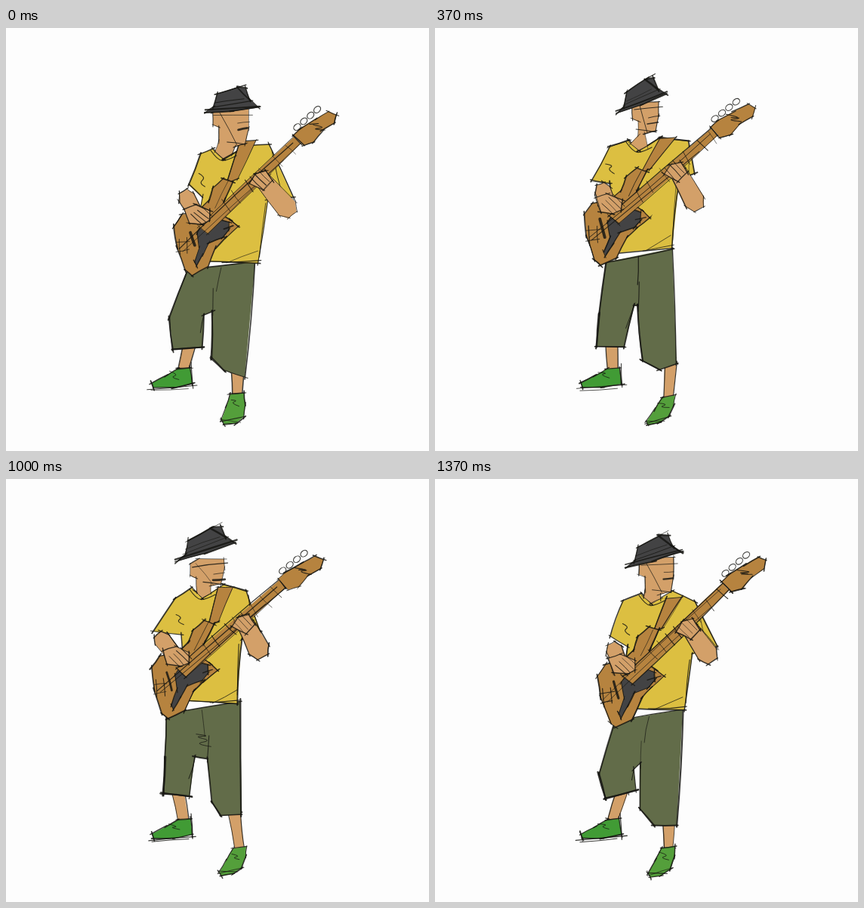
Recreate the animation shown at these times as an HTML page with a canvas. Size 560 px wide and 560 px high, loop 1500 ms.

```html
<!DOCTYPE html>
<html lang="en">
<head>
<meta charset="utf-8">
<title>Bass player sketch</title>
<style>
html, body { margin: 0; width: 100%; height: 100%; overflow: hidden; background: #fdfdfd; }
canvas { display: block; width: 560px; height: 560px; }
</style>
</head>
<body>
<canvas id="stage" width="560" height="560"></canvas>
<script>
const ctx = document.getElementById('stage').getContext('2d');
const PAPER = '#fdfdfd', INK = 'rgba(22,22,18,.84)';
const SKIN = '#d3a069', WOOD = '#b6833f', SHIRT = '#dcbf41', PANTS = '#626c49', DARK = '#434344';

const pts = s => s.split(' ').map(p => p.split(',').map(Number));
const mix = (a, b, k) => a.map((v, i) => v + (b[i] - v) * k);
const add = (p, x, y) => [p[0] + x, p[1] + y];

// hat: brim ends; head: ear, jaw, collar; bass: tail, tip; arms: elbows; foot: ankle, toe
// shirt: shoulders, right cuff, hem, left cuff; pants: clockwise from the waist
const pose = (hat, head, shirt, bass, arms, pants, foot) =>
  [hat, head, shirt, bass, arms, pants, foot].map(pts);

const right = pose('265,112 334,106', '274,112 321,153 288,173',
  '258,166 348,154 380,224 347,227 334,312 245,308 260,224 242,208',
  '225,299 438,114', '239,224 372,239',
  '240,320 330,309 316,462 290,454 272,437 273,375 262,380 260,423 221,426 216,384', '306,484 298,524');
const right2 = pose('254,117 326,97', '270,110 316,149 287,165',
  '248,162 344,162 374,221 341,232 330,306 242,303 255,222 232,208',
  '218,299 439,107', '237,226 361,232',
  '238,320 328,305 320,459 290,459 271,436 271,377 263,384 266,412 226,423 217,390', '309,487 294,526');
const midRight = pose('247,114 319,94', '262,108 310,142 282,163',
  '240,160 344,154 351,206 334,212 322,300 240,296 243,204 217,193',
  '211,291 432,104', '218,206 353,229',
  '230,304 322,298 313,459 285,449 272,436 271,385 264,387 258,415 222,423 217,378', '312,487 292,525');
const midLeft = pose('241,113 305,88', '261,104 296,136 270,162',
  '231,157 335,150 344,192 323,202 314,291 240,298 232,206 208,202',
  '199,284 425,105', '222,215 344,230',
  '226,310 314,292 320,445 297,452 274,440 268,368 264,368 250,422 214,421 217,380', '309,488 291,524');
const left = pose('226,109 303,85', '244,112 289,138 260,157',
  '224,158 318,148 337,202 312,212 306,297 240,294 232,206 195,202',
  '194,287 421,106', '206,212 335,226',
  '212,311 310,294 312,444 284,446 273,428 266,370 250,368 243,420 208,416 210,370', '309,488 294,524');
const farLeft = pose('222,107 291,95', '234,112 279,142 256,163',
  '212,163 310,154 322,192 306,204 304,303 238,298 232,216 193,208',
  '190,286 416,110', '202,219 327,227',
  '216,312 304,305 317,444 292,446 268,439 266,374 252,364 238,430 202,427 207,370', '309,478 311,520');

const halfway = left.map((part, i) => part.map((p, j) => mix(p, farLeft[i][j], .5)));
const poses = [right, right2, midRight, midLeft, left, halfway, farLeft];

// Hat: along and above the brim. Bass: along and across the neck.
const HAT = pts('0,0 .14,.2 .2,.8 .62,1.05 .76,.95 .84,.4 1,.02 .5,-.05');
const BODY = pts('22,-30 40,-35 62,-24 80,-25 96,-34 115,-35 122,-23 98,-12 80,-3 86,14 88,27 65,27 47,29 20,42 -3,36 -5,26 7,-6');
const GUARD = pts('40,-3 68,-13 74,2 82,14 75,23 63,25 44,18 27,25 10,31 12,24 30,14');
const NECK = pts('47,-8 225,-15 225,-2 50,8');
const STOCK = pts('225,-17 238,-18 262,-14 282,-10 287,0 277,7 258,4 240,8 226,2');
const HAND_R = pts('48,-38 64,-32 73,-14 64,-4 53,-7 41,-20');
const HAND_L = pts('138,-6 152,-11 165,-5 163,11 146,13');
const SHOE = pts('193,470 212,460 228,451 244,450 247,471 222,476 195,476');

let seed = 1;
const rand = () => (seed = (seed * 16807) % 2147483647) / 2147483647;
const jit = r => (rand() * 2 - 1) * r;

function stroke(path, width = 1, color = INK) {
  const last = path.length - 1;
  ctx.strokeStyle = color;
  ctx.lineWidth = width;
  ctx.beginPath();
  ctx.moveTo(...path[0]);
  for (let i = 1; i < last; i++)
    ctx.quadraticCurveTo(...path[i], ...(i === last - 1 ? path[last] : mix(path[i], path[i + 1], .5)));
  if (last === 1) ctx.lineTo(...path[1]);
  ctx.stroke();
}

// A loose pen line that runs slightly past both ends
function pen(a, b, width = 1) {
  const len = Math.hypot(b[0] - a[0], b[1] - a[1]) || 1;
  const over = (1 + rand() * 2.5) / len, bow = jit(.025);
  const mid = add(mix(a, b, .5), (a[1] - b[1]) * bow, (b[0] - a[0]) * bow);
  const path = [mix(a, b, -over), mid, mix(a, b, 1 + over)].map(p => add(p, jit(.9), jit(.9)));
  stroke(path, width * (.7 + rand() * .6));
}

function shape(path, fill, width = 1.2) {
  ctx.fillStyle = fill;
  ctx.beginPath();
  path.forEach(p => ctx.lineTo(...p));
  ctx.closePath();
  ctx.fill();
  path.forEach((p, i) => {
    const q = path[(i + 1) % path.length];
    pen(p, q, width);
    if (rand() < .3) pen(p, q, .8);
  });
}

function scribble(p, rx, ry, turns, width = .9) {
  const path = [];
  for (let i = 0; i < turns * 2; i++)
    path.push(add(p, (i % 2 ? rx : -rx) * (.6 + rand() * .4), ry * (i / turns - 1) + jit(2)));
  stroke(path, width);
}

function limb(a, b, wa, wb) {
  const len = Math.hypot(b[0] - a[0], b[1] - a[1]);
  const x = (b[0] - a[0]) / len, y = (b[1] - a[1]) / len;
  const at = (p, t, s) => add(p, x * t - y * s, y * t + x * s);
  return [at(a, 0, wa), at(a, -wa * .8, wa * .5), at(a, -wa * .8, -wa * .5), at(a, 0, -wa), at(b, 0, -wb), at(b, 0, wb)];
}

function drawLegs(pants, [ankle, toe], loops) {
  const [wl, wr, outR, midR, inR, crR, crL, inL, outL, knee] = pants;
  shape(limb(add(mix(outL, inL, .55), 0, -5), [235, 452], 8, 7), SKIN);
  shape(limb(add(mix(outR, midR, .35), 0, -5), add(ankle, 0, 2), 8, 6), SKIN);

  shape(SHOE, '#419b35', 1.4);
  pen([190, 478], [251, 473]);
  pen([194, 480], [240, 477], .9);
  pen([246, 446], [247, 474]);
  scribble([223, 461], 8, 5, 2);

  const slant = (toe[0] - ankle[0]) / (toe[1] - ankle[1]);
  const sole = (t, s) => add(mix(ankle, toe, t), s, s * slant * .4);
  shape([sole(0, -9), sole(0, 9), sole(.4, 14), sole(.8, 15), sole(1, 6), sole(1, -9), sole(.85, -14), sole(.4, -11)], '#549f3b', 1.4);
  pen(sole(.82, -14), sole(.95, 10));
  pen(sole(.9, -13), sole(.8, 16), .9);
  scribble(sole(.35, 0), 8, 6, 2);

  shape(pants, PANTS, 1.7);
  pen(outL, inL, 2);
  pen(knee, outL, 2.2);
  pen(inR, midR, 1.6);
  const fly = mix(wl, wr, .45);
  pen(add(fly, 4, 4), mix(add(fly, 4, 4), crR, .5));
  pen(add(crR, 2, -28), add(crR, 1, 4), .9);
  pen(crL, add(mix(crL, inL, .5), -3, 0), .9);
  if (loops) scribble(add(crR, -6, -24), 13, 10, 3);
}

function drawTorso([sl, sr, outR, inR, hemR, hemL, inL, outL], neck) {
  const throat = add(neck, 28, -17);
  shape([sl, add(neck, -14, -13), neck, throat, sr, outR, inR, hemR, hemL, inL, outL], SHIRT, 1.5);
  pen(mix(hemL, hemR, .5), add(hemR, 0, -4));
  pen(mix(hemL, hemR, .55), add(hemR, -3, -16), .9);
  pen(mix(sr, outR, .15), mix(inR, outR, .6), .9);
  scribble(add(mix(sl, inL, .72), 0, -4), 6, 10, 2, 1.1);
  pen(add(inR, -4, 8), mix(inR, hemR, .85), .9);
}

function drawHead([ear, jaw, neck], [a, b]) {
  const [ex, ey] = ear, [jx, jy] = jaw;
  shape([ear, [ex + 10, ey - 6], [jx, ey - 6], [jx, jy - 20], [jx - 4, jy], [jx - 18, jy + 4], add(neck, 11, -6), neck,
    add(neck, -11, -9), [ex + 8, ey + 38], [ex + 8, ey + 20], [ex, ey + 16]], SKIN, .9);
  stroke([add(neck, -17, -11), add(neck, -8, 2), add(neck, 4, 3), add(neck, 17, -4)], 1.2);
  pen([ex + 4, ey + 4], [jx + 3, ey - 2 + (jx - 270) / 10], .9);
  pen([ex + 10, ey + 2], [jx - 16, jy], .8);
  pen([jx - 12, ey + 22], [jx - 3, ey + 21], 2.2);
  pen([jx - 11, ey + 14], [jx - 2, ey + 13], .8);
  pen([jx - 26, jy - 2], [jx - 6, jy + 1], .9);

  const on = ([u, v]) => add(mix(a, b, u), 0, -v * 29);
  shape(HAT.map(on), DARK, 1.7);
  pen(on([0, .12]), on([1, .1]), 2);
  pen(on([.15, .25]), on([.86, .35]));
  pen(on([.18, .8]), on([.74, 1.12]));
  pen(on([.6, 1]), on([.84, .4]), 2);
  pen(on([.2, .42]), on([.7, .5]), .8);
}

function bassFrame([tail, tip]) {
  const dx = (tip[0] - tail[0]) / 288, dy = (tip[1] - tail[1]) / 288;
  return ([e, n]) => add(tail, dx * e - dy * n, dy * e + dx * n);
}

function drawBass(on) {
  const line = (a, b, c, d, w) => pen(on([a, b]), on([c, d]), w);
  const angle = Math.atan2(on([1, 0])[1] - on([0, 0])[1], on([1, 0])[0] - on([0, 0])[0]);
  for (let i = 0; i < 4; i++) {
    ctx.beginPath();
    ctx.ellipse(...on([236 + i * 12, -22]), 5, 3.8, angle, 0, 7);
    ctx.fillStyle = PAPER;
    ctx.fill();
    ctx.strokeStyle = INK;
    ctx.lineWidth = 1.1;
    ctx.stroke();
  }
  shape(BODY.map(on), WOOD, 1.5);
  shape(GUARD.map(on), DARK);
  shape(NECK.map(on), WOOD);
  shape(STOCK.map(on), WOOD, 1.3);

  line(12, -10, 24, -2);
  line(4, 0, 15, 6);
  line(16, -12, 4, 4);
  line(24, -6, 14, 8);
  line(33, -9, 26, 7, 3);
  line(10, -2, 215, -10);
  line(12, 3, 190, -1, .8);
  line(84, -14, 116, -28, .8);
  line(72, 18, 82, 22, 1.4);
  for (let e = 95; e < 225; e += 12 + rand() * 14) line(e, -12, e + jit(3), 3, .9);
  scribble(on([256, -5]), 13, 5, 3, 1.1);
}

function drawArms([elbowR, elbowL], on) {
  shape(limb(elbowL, on([154, 3]), 14, 11), SKIN);
  shape(HAND_L.map(on), SKIN);
  for (let e = 144; e < 164; e += 7) pen(on([e, -9]), on([e + 1, 7]), .9);
  shape(limb(elbowR, on([56, -24]), 11, 10), SKIN);
  shape(HAND_R.map(on), SKIN);
  for (let e = 50; e < 70; e += 6) pen(on([e, -24]), on([e + 2, -8]), .9);
}

function draw(n) {
  const [hat, head, shirt, bass, arms, pants, foot] = poses[n];
  const on = bassFrame(bass);
  seed = 977 + n * 131;
  ctx.fillStyle = PAPER;
  ctx.fillRect(0, 0, 560, 560);
  ctx.lineCap = ctx.lineJoin = 'round';
  drawLegs(pants, foot, n > 3 || n === 2);
  drawTorso(shirt, head[2]);
  const sr = shirt[1], horn = on([118, -24]);
  shape([add(sr, -38, -4), add(sr, -17, -5), add(horn, 9, -5), add(horn, -4, 0)], WOOD);
  drawHead(head, hat);
  drawBass(on);
  drawArms(arms, on);
}

// Sway over to the left and back again
const STARTS = [0, 120, 250, 370, 500, 620, 750, 870, 1000, 1120, 1250, 1370];
const LOOP = 1500, t0 = performance.now();
let shown = -1;

function tick() {
  const t = (performance.now() - t0) % LOOP;
  const step = STARTS.filter(s => s <= t).length - 1;
  const n = step > 6 ? 12 - step : step;
  if (n !== shown) draw(shown = n);
  requestAnimationFrame(tick);
}
tick();
</script>
</body>
</html>
```
